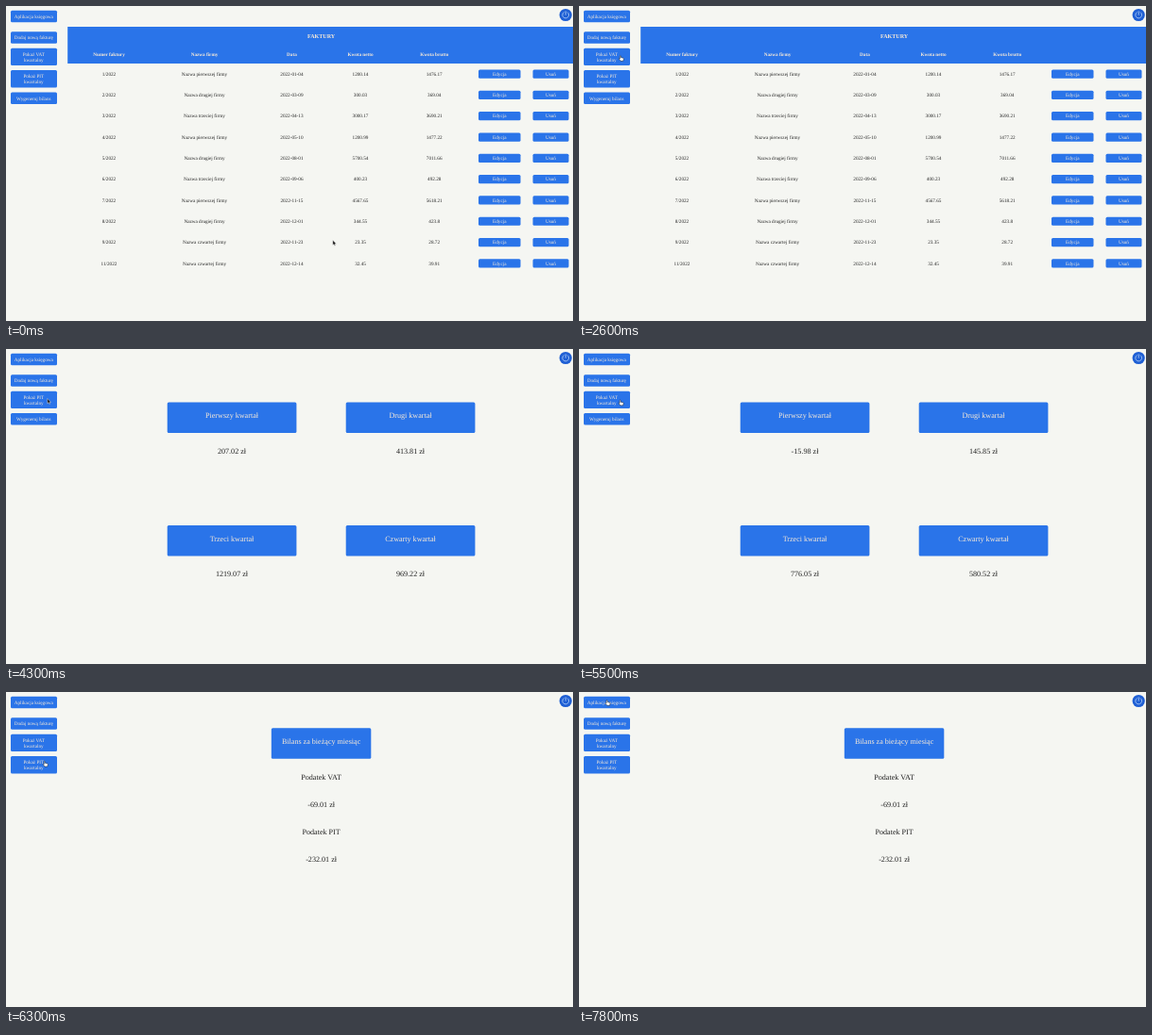
Recreate the animation shown at these times as an HTML page. Size 600 by 334 pixels, loop 8 s.

```html
<!DOCTYPE html>
<html lang="pl">
<head>
<meta charset="utf-8">
<style>
html, body { margin: 0; height: 100%; overflow: hidden; background: #f5f6f2; }
svg { display: block; width: 100%; height: 100%; }
text { font: 5.2px "Liberation Serif", serif; text-anchor: middle; text-rendering: geometricPrecision; fill: #222; }
.light { fill: #faebd7; }
.bold { font-weight: bold; }
.title { font-size: 6.05px; }
.big { font-size: 8.1px; }
</style>
</head>
<body>
<svg id="stage" viewBox="0 0 600 334"></svg>
<script>
const BLUE = '#2a74e9';
const rect = (x, y, w, h, r = 1.5) =>
  `<rect x="${x}" y="${y}" width="${w}" height="${h}" rx="${r}" fill="${BLUE}"/>`;
// y is the middle of the capitals
const text = (s, x, y, cls = '') =>
  `<text x="${x}" y="${y + (/big/.test(cls) ? 2.7 : 1.75)}" class="${cls}">${s}</text>`;

function sideButton(lines, y) {
  const h = lines.length > 1 ? 18.4 : 12.5;
  return rect(5, y, 49, h) + lines.map((s, i) =>
    text(s, 29.3, y + h / 2 + (i - (lines.length - 1) / 2) * 6, 'light')).join('');
}

const VAT = ['Pokaż VAT', 'kwartalny'], PIT = ['Pokaż PIT', 'kwartalny'], BALANCE = ['Wygeneruj bilans'];

function menu(...items) {
  let y = 44.7;
  return items.map(lines => {
    const s = sideButton(lines, y);
    y += lines.length > 1 ? 23.4 : 17.5;
    return s;
  }).join('');
}

function invoices() {
  const cols = [109, 210, 302.4, 375, 453.2];
  const heads = ['Numer faktury', 'Nazwa firmy', 'Data', 'Kwota netto', 'Kwota brutto'];
  const firms = ['pierwszej', 'drugiej', 'trzeciej', 'czwartej'];
  const rows = [
    ['1', 0, '01-04', '1200.14', '1476.17'],
    ['2', 1, '03-09', '300.03', '369.04'],
    ['3', 2, '04-13', '3000.17', '3690.21'],
    ['4', 0, '05-10', '1200.99', '1477.22'],
    ['5', 1, '08-01', '5700.54', '7011.66'],
    ['6', 2, '09-06', '400.23', '492.28'],
    ['7', 0, '11-15', '4567.65', '5618.21'],
    ['8', 1, '12-01', '344.55', '423.8'],
    ['9', 3, '11-23', '23.35', '28.72'],
    ['11', 3, '12-14', '32.45', '39.91']
  ];
  let s = rect(65.2, 22, 535, 39, 0) + text('FAKTURY', 333.6, 32, 'light bold title');
  heads.forEach((h, i) => s += text(h, cols[i], 51.3, 'light bold'));
  rows.forEach(([no, firm, date, net, gross], r) => {
    const y = 72.1 + r * 22.31;
    [no + '/2022', `Nazwa ${firms[firm]} firmy`, '2022-' + date, net, gross]
      .forEach((v, i) => s += text(v, cols[i], y));
    s += rect(500, y - 4.6, 44.5, 9.2) + text('Edycja', 522.3, y, 'light');
    s += rect(557.5, y - 4.6, 38, 9.2) + text('Usuń', 576.5, y, 'light');
  });
  return s;
}

const quarters = sums => ['Pierwszy', 'Drugi', 'Trzeci', 'Czwarty'].map((name, i) => {
  const x = 239 + (i % 2) * 189, y = 56.4 + (i >> 1) * 130.5;
  return rect(x - 68.3, y, 136.7, 32.6) + text(name + ' kwartał', x, y + 14.2, 'light big') +
    text(sums[i] + ' zł', x, y + 51.8, 'big');
}).join('');

const balance = () => rect(280.8, 38.2, 105.5, 32.6) +
  text('Bilans za bieżący miesiąc', 333.6, 52.3, 'light big') +
  ['Podatek VAT', '-69.01 zł', 'Podatek PIT', '-232.01 zł']
    .map((s, i) => text(s, 333.6, 90 + i * 29, 'big')).join('');

const pages = [
  { from: 0, body: menu(VAT, PIT, BALANCE) + invoices() },
  { from: 2700, body: menu(PIT, BALANCE) + quarters(['207.02', '413.81', '1219.07', '969.22']) },
  { from: 4600, body: menu(VAT, BALANCE) + quarters(['-15.98', '145.85', '776.05', '580.52']) },
  { from: 6300, body: menu(VAT, PIT) + balance() }
];

const stage = document.getElementById('stage');
stage.innerHTML =
  '<rect width="600" height="334" fill="#f5f6f2"/>' +
  sideButton(['Aplikacja księgowa'], 4.7) + sideButton(['Dodaj nową fakturę'], 27.2) +
  `<circle cx="592.2" cy="9.5" r="6.6" fill="#1f5fd4"/>
   <g fill="none" stroke="#a9c9f5" stroke-width=".9" stroke-linecap="round">
     <path d="M590.2 6.7a3.4 3.4 0 1 0 4 0M592.2 5.8v3.4"/></g>` +
  pages.map(p => `<g class="page">${p.body}</g>`).join('') +
  `<g id="cursor" stroke-linejoin="round">
     <path id="arrow" d="M0 0V5.3L1.2 4.2 2 6 2.9 5.6 2.1 3.9H3.7Z" fill="#111" stroke="#fff" stroke-width=".4"/>
     <path id="hand" d="M-.5.4Q0-.3.5.4V2.1L3 2.7Q3.6 2.9 3.5 3.6L3 5.8H.2L-1.6 3.5Q-1.4 2.8-.5 3.5Z"
       fill="#fff" stroke="#111" stroke-width=".45"/></g>`;

const groups = stage.querySelectorAll('.page');
const [cursor, arrow, hand] = ['cursor', 'arrow', 'hand'].map(id => document.getElementById(id));
const show = (el, on) => el.setAttribute('visibility', on ? 'visible' : 'hidden');

// time, x, y of the pointer tip
const path = [
  [0, 345.8, 248.3], [700, 350, 222.8], [800, 350, 222.8], [900, 350.3, 223.2],
  [1000, 350.3, 223.2], [1800, 43.8, 52.5], [5400, 43.8, 52.5], [6000, 40.8, 73.2],
  [6300, 40.8, 73.2], [7000, 346, 143.5], [7100, 346, 143.5], [7800, 29.5, 8.5], [8000, 29.5, 8.5]
];
const presses = [[2300, 2600], [4300, 4500], [6000, 6200]];

function pointer(t) {
  const i = path.findIndex(p => p[0] > t);
  const [t0, x0, y0] = path[i - 1], [t1, x1, y1] = path[i];
  const u = (t - t0) / (t1 - t0), e = u * u * (3 - 2 * u);
  return [x0 + (x1 - x0) * e, y0 + (y1 - y0) * e];
}

function draw(now) {
  const t = Math.floor(now % 8000 / 100) * 100;
  const current = pages.filter(p => p.from <= t).length - 1;
  groups.forEach((g, i) => show(g, i === current));
  const [x, y] = pointer(t);
  const isHand = x < 54 && !presses.some(([a, b]) => t >= a && t < b);
  cursor.setAttribute('transform', `translate(${x} ${y})`);
  show(hand, isHand);
  show(arrow, !isHand);
  requestAnimationFrame(draw);
}
draw(0);
</script>
</body>
</html>
```
